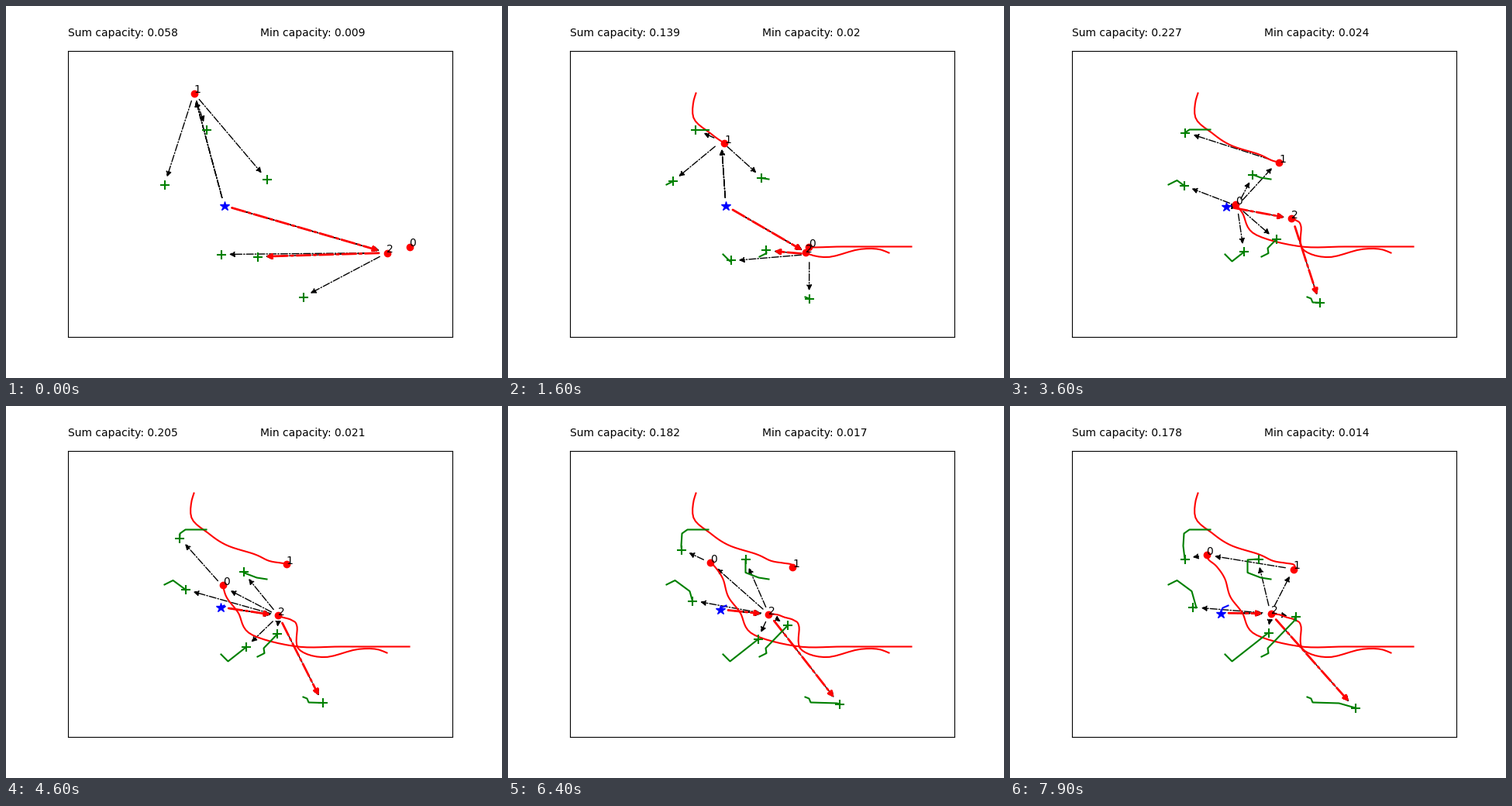
Recreate the animation shown at these times as a matplotlib script. Size 640 by 480 pixels, loop 8 s.

```python
import numpy as np
import matplotlib.pyplot as plt
from matplotlib.animation import FuncAnimation
from matplotlib.patches import FancyArrowPatch

FRAMES, STEP = 80, 100
T = np.arange(FRAMES)
U = T / (FRAMES - 1)


def walk(*points, ease=1.0):
    """Straight legs, distance covered grows as a power of time."""
    p = np.array(points, float)
    dist = np.append(0, np.cumsum(np.hypot(*np.diff(p, axis=0).T)))
    s = dist[-1] * U ** ease
    return np.column_stack([np.interp(s, dist, c) for c in p.T])


def glide(*points):
    """Cubic spline whose points lie further apart in time as it slows down."""
    p = np.array(points, float)
    t = np.linspace(0, 1, len(p)) ** 1.5
    m = np.gradient(p, t, axis=0)
    i = np.clip(np.searchsorted(t, U, side="right") - 1, 0, len(t) - 2)
    h = (t[i + 1] - t[i])[:, None]
    s = (U - t[i])[:, None] / h
    return ((1 + 2 * s) * (1 - s) ** 2 * p[i] + s * (1 - s) ** 2 * h * m[i]
            + s ** 2 * (3 - 2 * s) * p[i + 1] + s ** 2 * (s - 1) * h * m[i + 1])


drones = {
    "0": glide((520, 310), (503, 310), (471, 310), (430, 310), (376, 310),
               (316.5, 294.5), (299, 266), (284, 246), (277, 223),
               (266.5, 207), (256, 198), (253, 191)),
    "1": glide((242, 112), (239, 122), (239, 144), (261, 164), (284, 179),
               (319.5, 190.5), (338, 199), (354, 202), (364, 203.5),
               (367, 206), (366, 208.5), (365, 210)),
    "2": glide((491, 318), (480, 313.8), (454, 313.3), (412.5, 323.5), (378, 314),
               (375, 284), (368.5, 276), (356, 272), (348, 269),
               (339.5, 268), (334, 269), (336, 267)),
}
users = {
    "A": walk((258, 159), (231, 159), (224, 164), (223, 180), (225, 197), ease=0.9),
    "B": walk((204, 230), (215, 224.5), (234, 238.5), (240, 260), (235, 259), ease=1.2),
    "C": walk((336, 223), (323, 221), (306, 214.5), (306, 198), (320, 197), ease=1.2),
    "D": walk((277, 320), (286, 329), (333, 292)),
    "E": walk((324, 323), (333, 318.5), (332, 312), (366, 277), (368, 271)),
    "F": walk((383, 375), (388, 377), (390, 382), (424, 383), (445, 389), ease=1.5),
}
base = walk((281, 257), (274, 260), (271, 267), ease=2)
nodes = {"S": base, **drones, **users}

# start, one route per user, user on the weakest route
routes = [
    (0, "S1A S1B S1C S2D S2E S2F", "E"),
    (18, "S021A S021B S0C S0D S0E S02F", "A"),
    (29, "S01A S0B S0C S0D S0E S2F", "F"),
    (45, "S20A S2B S2C S2D S2E S2F", "F"),
    (75, "S210A S2B S2C S2D S2E S2F", "F"),
]

keys = [0, 9, 24, 36, 57, 72, 79]
total = np.interp(T, keys, [.058, .093, .191, .227, .18, .184, .178])
least = np.interp(T, keys, [.009, .013, .029, .024, .018, .015, .014])

# data units are pixels, whole numbers fall on pixel centres
fig, ax = plt.subplots(figsize=(6.4, 4.8), dpi=100)
ax.set(xlim=(79.5, 575.5), ylim=(426.7, 57.1), xticks=[], yticks=[])
sum_text = ax.text(0, 1.05, "", transform=ax.transAxes)
min_text = ax.text(0.5, 1.05, "", transform=ax.transAxes)


def mover(path, color, marker, **style):
    trail, = ax.plot([], [], color=color, lw=1.5)
    head, = ax.plot([], [], color=color, marker=marker, ls="", **style)
    return path, trail, head


movers = [mover(p, "red", "o") for p in drones.values()]
movers += [mover(p, "green", "+", ms=8, mew=1.5) for p in users.values()]
movers.append(mover(base, "blue", "*", ms=9))
labels = {name: ax.text(0, 0, name) for name in drones}
arrows = []


def link(route, n, color, width):
    for a, b in zip(route, route[1:]):
        arrow = FancyArrowPatch(nodes[a][n], nodes[b][n], arrowstyle="-|>",
                                mutation_scale=10, shrinkA=7.5, shrinkB=7.5,
                                color=color, lw=width, ls="-.", zorder=1)
        arrows.append(ax.add_patch(arrow))


def draw(n):
    for path, trail, head in movers:
        trail.set_data(*path[:n + 1].T)
        head.set_data(*path[n:n + 1].T)
    for name, label in labels.items():
        label.set_position(drones[name][n])

    while arrows:
        arrows.pop().remove()
    _, plan, weak = [r for r in routes if r[0] <= n][-1]
    # links lag the nodes by one step
    prev = max(n - 1, 0)
    plan = plan.split()
    for route in plan:
        link(route, prev, "black", 1)
    link(next(r for r in plan if r[-1] == weak), prev, "red", 2)

    sum_text.set_text(f"Sum capacity: {round(float(total[n]), 3)}")
    min_text.set_text(f"Min capacity: {round(float(least[n]), 3)}")
    return []


anim = FuncAnimation(fig, draw, frames=FRAMES, interval=STEP, repeat=True,
                     repeat_delay=0, blit=False)
plt.show()
```
